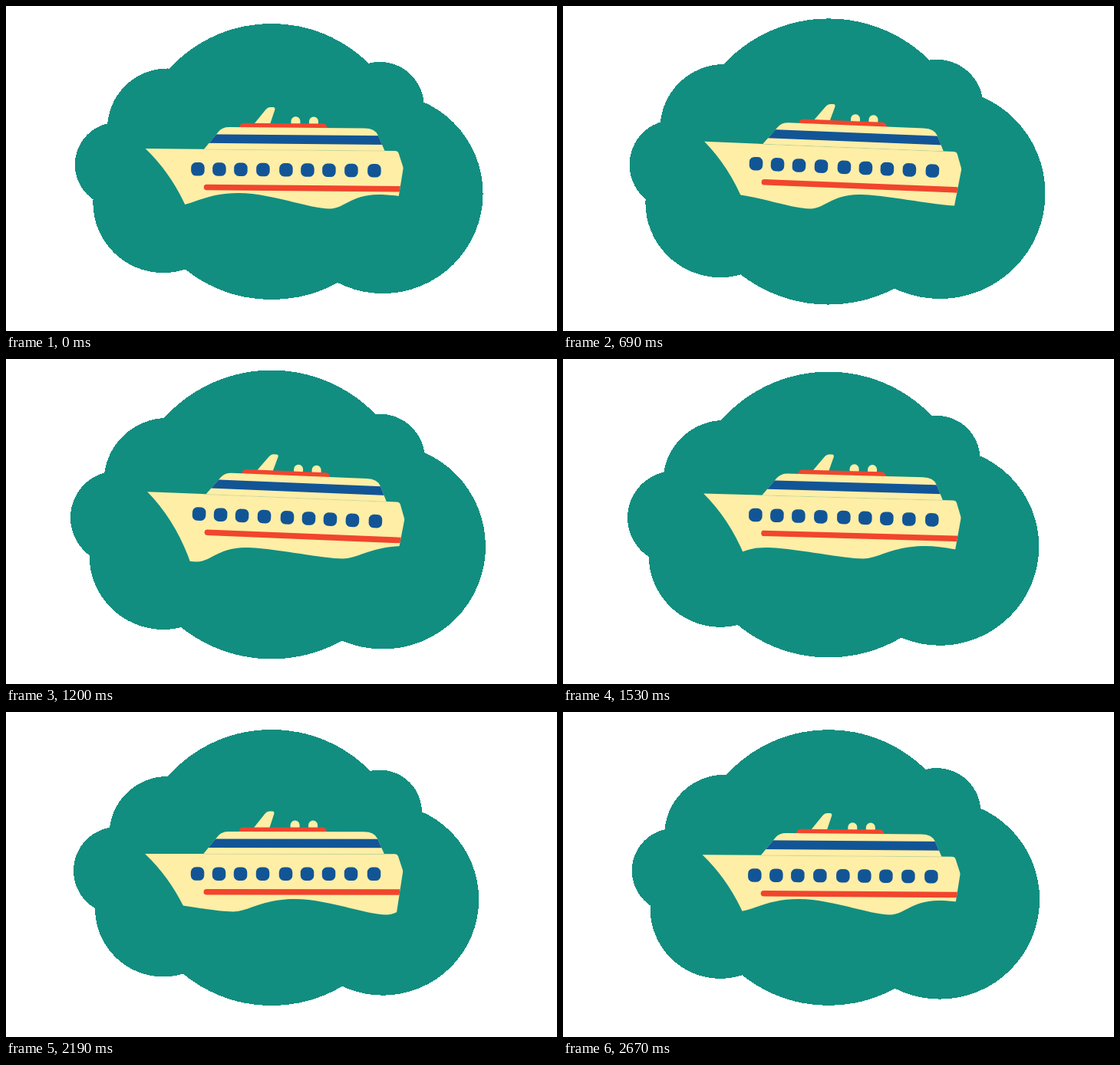
Animation of 718 by 424 pixels, one loop 2.7 s. Source, as an HTML page:

```html
<!DOCTYPE html>
<html lang="en">
<head>
<meta charset="utf-8">
<title>Cruise ship</title>
<style>
  html, body { margin: 0; width: 100%; height: 100%; overflow: hidden; background: #fff; }
  svg { display: block; }
  .sea { fill: #118e80; }
  .cream { fill: #ffeea6; }
  .red { fill: #f1452d; }
  .blue { fill: #125596; }
</style>
</head>
<body>
<svg width="718" height="424" viewBox="0 0 718 424">
  <defs>
    <path id="hull" d="M181 185H506Q510 185 511 188L516.6 205Q517.3 207 517 209L505 288H246L238 268Q217 219 181 185Z"/>
    <path id="cabin" d="M257 185.4L276 162Q281 156 290 156H466Q480 156 484 165L493 185.4Z"/>
    <clipPath id="inHull"><use href="#hull"/></clipPath>
    <clipPath id="inCabin"><use href="#cabin"/></clipPath>
  </defs>
  <g id="cloud" class="sea" shape-rendering="crispEdges"></g>
  <g id="ship">
    <path class="cream" d="M322 152L337.500 132.500Q340 129.500 343 129.500H347Q350 129.500 349.200 133L343 152Z"/>
    <path class="cream" d="M370.500 152V147.500a6 6 0 0 1 12 0V152ZM394 152V147.500a6 6 0 0 1 12 0V152Z"/>
    <path class="red" d="M303 157Q304 150.500 309 150.500H412Q417 150.500 418 157Z"/>
    <use href="#hull" class="cream"/>
    <use href="#cabin" class="cream"/>
    <path d="M257 185.300H493" stroke="#118e80" stroke-opacity=".3" stroke-width=".6"/>
    <rect class="blue" x="250" y="165.500" width="250" height="11.600" clip-path="url(#inCabin)"/>
    <g id="windows" class="blue"></g>
    <g clip-path="url(#inHull)">
      <rect class="red" x="257.500" y="231" width="280" height="7.500" rx="3.750"/>
    </g>
  </g>
  <svg x="200" y="230" width="340" height="80" viewBox="200 230 340 80">
    <path id="wave" class="sea"/>
  </svg>
</svg>
<script>
const LOOP = 2700, STEP = 30, WAVE = 390;
const $ = id => document.getElementById(id);

function add(parent, tag, attrs) {
  const el = document.createElementNS("http://www.w3.org/2000/svg", tag);
  for (const key in attrs) el.setAttribute(key, attrs[key]);
  return parent.appendChild(el);
}

// Cosine swing that peaks at the given time in the loop
const swing = (t, peak) => Math.cos((t - peak) / LOOP * 2 * Math.PI);

// cx, cy, mean radius, amplitude, peak time
const puffs = [
  [346, 203, 183.9, 4.6, 1100],
  [491, 244.5, 131.2, 6.3, 720],
  [210.5, 160, 80.2, 4.2, 850],
  [145, 207, 58.2, 3, 1340],
  [205, 256.5, 93.4, 4.5, 845],
  [487, 130.5, 57.7, 3, 690]
].map(([cx, cy, r, amp, peak]) =>
  ({ el: add($("cloud"), "circle", { cx, cy }), r, amp, peak }));

for (const x of [249.5, 277.5, 305.5, 334.5, 364.5, 392.5, 420.5, 449.5, 479.5])
  add($("windows"), "rect", { x: x - 8.75, y: 202.4, width: 17.5, height: 17.5, rx: 6.5 });

// One wave period: two troughs and two crests
const swell = "c18 0 28 -18.5 63 -18.5c35 0 100 14.5 127 14.5" +
  "c20 0 38 -16.5 81 -16.5c42 0 92 20.5 119 20.5";
$("wave").setAttribute("d", "M32 264.5" + swell.repeat(3) + "V320H32Z");

function draw(t) {
  for (const p of puffs) p.el.setAttribute("r", p.r + p.amp * swing(t, p.peak));
  const bob = 3.7 * swing(t, 40) - 1;
  const tilt = 1.28 * (1 + swing(t, 960));
  $("ship").setAttribute("transform", `translate(0 ${bob}) rotate(${tilt} 365 260)`);
  $("wave").setAttribute("transform", `translate(${-WAVE * t / LOOP} 0)`);
}

const start = performance.now();
function tick() {
  const t = Math.max(0, performance.now() - start) % LOOP;
  draw(Math.floor(t / STEP) * STEP);
  requestAnimationFrame(tick);
}
tick();
</script>
</body>
</html>
```
